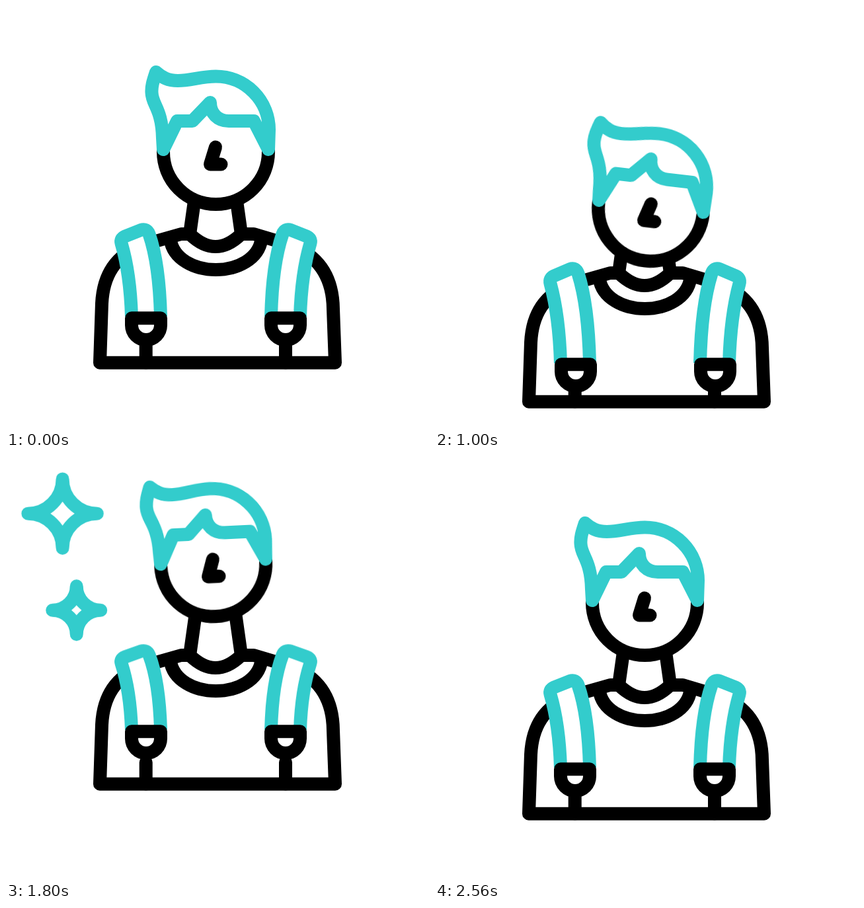
Write an HTML page without scripts that moves like this. It is 640 by 640 pixels and loops after 3 s.

```html
<!DOCTYPE html>
<html lang="en">
<head>
<meta charset="utf-8">
<title>Person with backpack</title>
<style>
  html, body { margin: 0; width: 100%; height: 100%; overflow: hidden; background: #fff; }
  svg { display: block; width: 100%; height: 100%; }
  path {
    fill: none; stroke: #000; stroke-width: 20;
    stroke-linecap: round; stroke-linejoin: round;
  }
  .teal { stroke: #33cccc; }
  .solid { fill: #fff; }

  /* every part dips, springs up and settles in the same rhythm */
  .body, .strap, .buckle, .head { animation: hop 3s infinite; }
  .body { --down: translate(0px, 59px); --up: translate(0px, -45px); }
  .buckle { --down: translate(1px, 11px); --up: translate(0px, -12px); }
  .strap {
    --down: scale(1, 1.085); --up: scale(1, .908);
    transform-origin: 0 338px;
    stroke-linecap: butt;
    vector-effect: non-scaling-stroke;
  }
  .head {
    --down: translate(9.5px, 86px) rotate(6.6deg);
    --up: translate(-4px, -58.7px) rotate(-2.7deg);
    transform-origin: 317.5px 217px;
  }
  @keyframes hop {
    0% { transform: none; }
    6.667% { transform: none; animation-timing-function: cubic-bezier(.48, 0, .24, 1); }
    33.333% { transform: var(--down); animation-timing-function: cubic-bezier(.5, 0, .22, 1); }
    60% { transform: var(--up); animation-timing-function: cubic-bezier(.55, 0, .06, 1); }
    86.667%, 100% { transform: none; }
  }

  .star { vector-effect: non-scaling-stroke; opacity: 0; }
  .big { --from: scale(.53); --to: scale(1.11); animation: size 3s infinite, fade-big 3s linear infinite; }
  .small { --from: scale(.784); --to: scale(.723); animation: size 3s infinite, fade-small 3s linear infinite; }
  @keyframes size {
    0%, 40% { transform: var(--from); animation-timing-function: cubic-bezier(.333, 0, .667, 1); }
    65.333%, 100% { transform: var(--to); }
  }
  @keyframes fade-big {
    0%, 40% { opacity: 0; }
    42.667%, 66.667% { opacity: 1; }
    70.667%, 100% { opacity: 0; }
  }
  @keyframes fade-small {
    0%, 42.667% { opacity: 0; }
    45.333%, 68% { opacity: 1; }
    72%, 100% { opacity: 0; }
  }
</style>
</head>
<body>
<svg viewBox="0 0 640 640">
  <g transform="translate(85.5 85.5)">
    <path class="star big teal" d="M0-50A50 50 0 0 0 50 0A50 50 0 0 0 0 50A50 50 0 0 0-50 0A50 50 0 0 0 0-50Z"/>
  </g>
  <g transform="translate(106.7 231.8)">
    <path class="star small teal" d="M0-50A50 50 0 0 0 50 0A50 50 0 0 0 0 50A50 50 0 0 0-50 0A50 50 0 0 0 0-50Z"/>
  </g>

  <g class="body">
    <!-- torso, neck and collar -->
    <path d="M278 345H265L205 362C165 378 147 408 145 450L142 539.7H498L494.7 450C492 408 472 378 432 362L375 345H356"/>
    <path d="M288 274L278 345Q317 383 356 345L346 274"/>
    <path d="M248.500 353C253 383 285 399 317.500 399S382 383 386.500 353"/>
    <path d="M211.700 507V539.500M423 507V539.500"/>

    <path class="strap teal solid" d="M190 470Q188 405 174.500 359Q172.500 352 180 348.500L204 339Q213 336 216.500 345Q232 390 234 470"/>
    <g transform="translate(635) scale(-1 1)">
      <path class="strap teal solid" d="M190 470Q188 405 174.500 359Q172.500 352 180 348.500L204 339Q213 336 216.500 345Q232 390 234 470"/>
    </g>

    <g class="buckle">
      <path class="solid" d="M190 472.300H234V483A22 22 0 0 1 190 483Z"/>
      <path class="solid" d="M401 472.300H445V483A22 22 0 0 1 401 483Z"/>
    </g>
  </g>

  <g class="head">
    <path class="solid" d="M238 217V220.500A79.500 79.500 0 0 0 397 220.500V217"/>
    <path d="M317 213.500L309 239.500H325.500"/>
    <path class="teal solid" d="M238 217L237 200C236 155 221 150 220.500 131C220 122 222 115 227 100C236 108 245 113 260 113C280 113 295 106.500 317.500 106.500A80.500 80.500 0 0 1 398 187L397 217L375 174H337C320 174 309 162 309 146L282 174H259Z"/>
  </g>
</svg>
</body>
</html>
```
